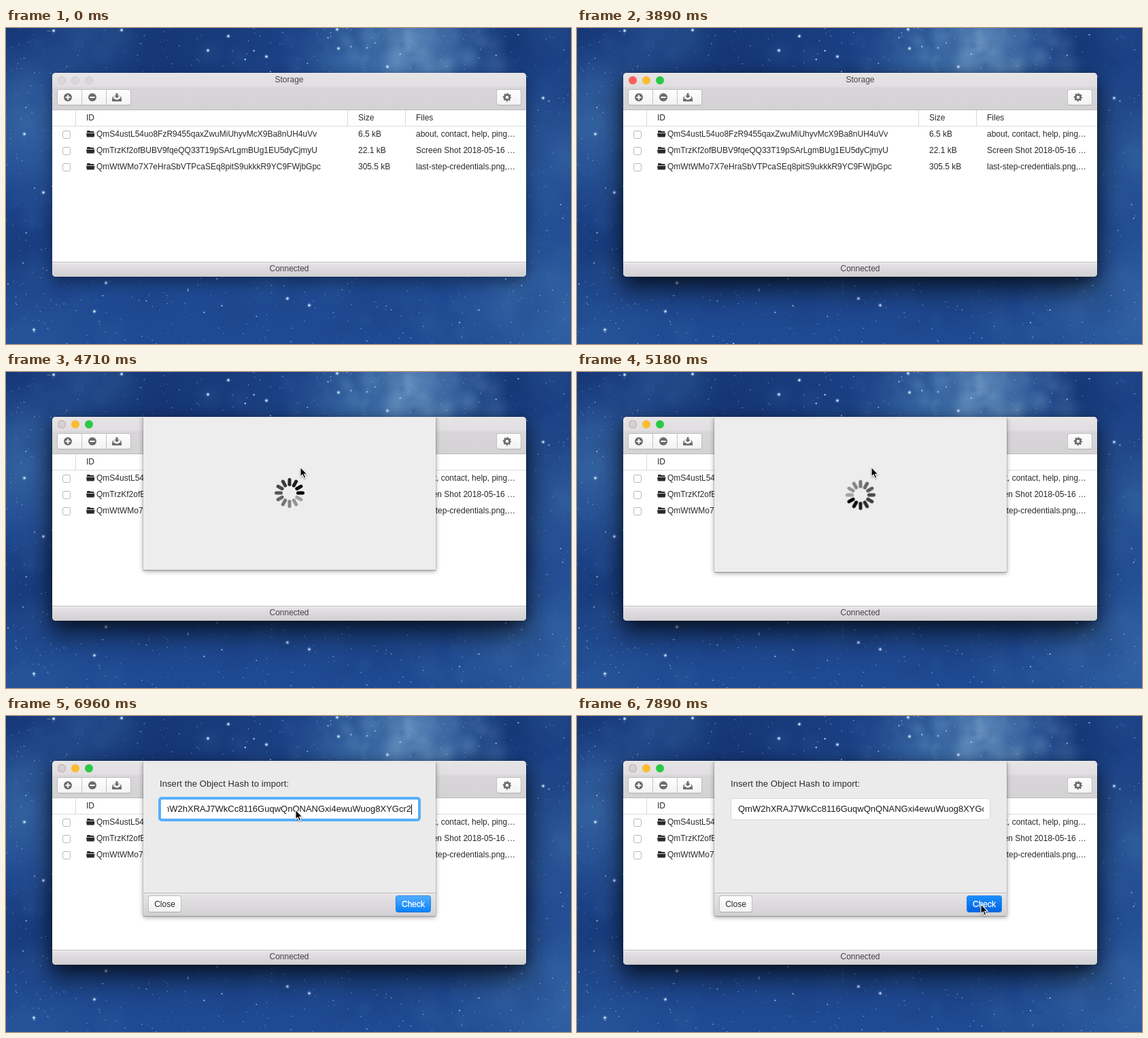
Recreate the animation shown at these times as an HTML page with a canvas. Size 831 px wide and 465 px high, loop 8000 ms.

```html
<!DOCTYPE html>
<html lang="en">
<head>
<meta charset="utf-8">
<title>Storage</title>
<style>
html, body { margin: 0; width: 100%; height: 100%; overflow: hidden; background: #1d4589; }
body { position: relative; font: 12px/16px "Liberation Sans", Arial, sans-serif; color: #2a2a2a; white-space: nowrap; }
body * { position: absolute; box-sizing: border-box; }
svg * { position: static; }
#sky { left: 0; top: 0; }

/* every animated part jumps between poses within one 8 s loop */
.a { animation: 8s step-end infinite; }

.shadow { left: 68px; top: 66px; width: 697px; height: 300px; border-radius: 5px; }
#idle { box-shadow: 0 0 1px rgba(0,0,0,.5), 0 8px 22px rgba(0,0,0,.4); }
#active { box-shadow: 0 0 1px rgba(0,0,0,.6), 0 20px 44px rgba(0,0,0,.58); animation-name: focus; }
@keyframes focus { 0% { opacity: 0 } 6.25%, 100% { opacity: 1 } }

#win { left: 68px; top: 66px; width: 697px; height: 300px; border-radius: 5px; overflow: hidden; background: #fff; }
#bar { left: 0; top: 0; width: 697px; height: 55px; border-bottom: 1px solid #bebcbe;
  background: linear-gradient(#f3f2f3 0, #e6e4e6 1px, #e0dee0 20px, #d8d6d8 22px, #d4d2d4 55px); }
#status { left: 0; top: 278px; width: 697px; height: 22px; border-top: 1px solid #bebcbe;
  background: linear-gradient(#f2f1f2 0, #e4e2e4 2px, #d1cfd1); }
.mid { left: 0; width: 100%; text-align: center; color: #454345; }

.light { top: 5px; width: 12px; height: 12px; border-radius: 50%; }
.off { background: #d3d1d3; border: 1px solid #bfbdbf; }
#ghost { left: 0; top: 0; }
#ghost .light { background: #d9d7d9; border: 1px solid #cbc9cb; }
#lights { left: 0; top: 0; animation-name: focus; }
#shut { animation-name: shut; }
@keyframes shut { 0% { opacity: 0 } 56.125%, 100% { opacity: 1 } }

.btn { border: 1px solid #c0bec0; border-bottom-color: #aeacae; border-radius: 4px; background: linear-gradient(#fdfdfd, #f3f3f3); }
.btn svg { left: -1px; top: -1px; }
#press { left: 72px; top: 0; width: 35px; height: 22px; background: #dcdcdc; animation-name: press; }
@keyframes press { 0% { opacity: 0 } 54.625% { opacity: 1 } 56.125%, 100% { opacity: 0 } }

#head { left: 0; top: 55px; width: 697px; height: 24px; border-bottom: 1px solid #dcdcdc; }
#head i { top: 0; width: 1px; height: 23px; background: #d9d9d9; }
#head span { top: 3px; }
.row { left: 0; width: 697px; height: 24px; }
.row span { top: 4px; }
.box { left: 15px; top: 7px; width: 12px; height: 12px; border: 1px solid #b9b9b9; border-radius: 3px; background: #fff; }
.row svg { left: 50px; top: 7px; }

#clip { left: 190px; top: 67px; width: 455px; height: 250px; overflow: hidden; }
#sheet { left: 12px; top: 0; width: 430px; height: 228px; background: linear-gradient(#e6e6e6, #ededed 4px);
  border-bottom: 1px solid #a9a9a9; box-shadow: 0 0 1px rgba(0,0,0,.6), 0 1px 7px rgba(0,0,0,.38); animation-name: drop; }
@keyframes drop {
  0% { transform: translateY(-250px) }
  56.125% { transform: translateY(-185px) }
  57.5% { transform: translateY(-52px) }
  58.875% { transform: translateY(-3px) }
  60.375%, 100% { transform: none }
}
#spin { left: 191px; top: 90px; animation-name: spin; }
@keyframes spin {
  0% { transform: rotate(-60deg) }
  57.5% { transform: rotate(-30deg) }
  58.875% { transform: rotate(0deg) }
  60.375% { transform: rotate(30deg) }
  61.75% { transform: rotate(60deg) }
  63.25% { transform: rotate(120deg) }
  64.75%, 100% { transform: rotate(150deg) }
}

#form { left: 0; top: 0; width: 430px; height: 227px; background: linear-gradient(#e6e6e6, #ebebeb 4px); animation-name: form; }
@keyframes form { 0% { opacity: 0 } 67.625%, 100% { opacity: 1 } }
#label { left: 24px; top: 25px; font-size: 13px; letter-spacing: .09px; }
#field { left: 24px; top: 54px; width: 382px; height: 32px; background: #fff; border: 1px solid #d9d9d9; border-radius: 4px; }
#ring { left: -3px; top: -3px; width: 386px; height: 36px; border: 4px solid #58aefa; border-radius: 5px; animation-name: ring; }
@keyframes ring { 0% { opacity: 0 } 75% { opacity: 1 } 98.625%, 100% { opacity: 0 } }
#view { left: 10px; top: 5px; width: 361px; height: 20px; overflow: hidden; font-size: 13px; line-height: 20px; color: #1c1c1c; }
#view span { top: 0; left: 0; }
#hint { color: #757575; animation-name: hint; }
@keyframes hint { 0% { opacity: 1 } 87%, 100% { opacity: 0 } }
#view #tail { left: auto; right: 2px; animation-name: tail; }
@keyframes tail { 0% { opacity: 0 } 87% { opacity: 1 } 98.625%, 100% { opacity: 0 } }
#start { animation-name: start; }
@keyframes start { 0% { opacity: 0 } 98.625%, 100% { opacity: 1 } }
#caret { left: 0; top: 3px; width: 1px; height: 15px; background: #000; animation-name: caret; }
@keyframes caret {
  0% { opacity: 0; left: 0 }
  75% { opacity: 1; left: 0 }
  81% { opacity: 0; left: 0 }
  87% { opacity: 1; left: 359px }
  92.875%, 100% { opacity: 0; left: 359px }
}
#foot { left: 0; top: 193px; width: 430px; height: 34px; border-top: 1px solid #bab8ba;
  background: linear-gradient(#f0eff0 0, #e5e3e5 2px, #d2d0d2); }
#foot .btn { top: 3px; height: 25px; line-height: 24px; text-align: center; }
#foot #check { left: 371px; width: 52px; color: #fff; border-color: #2a8ff0 #1a84ee #0a72dc;
  background: linear-gradient(#52adff, #0a82fb); -webkit-text-stroke: .3px #fff; animation-name: check; }
@keyframes check {
  0% { opacity: 0 }
  87% { opacity: 1; background: linear-gradient(#52adff, #0a82fb) }
  98.625%, 100% { opacity: 1; background: linear-gradient(#1d8dff, #0064e0) }
}

#cursor { left: -2px; top: -2px; filter: drop-shadow(0 1px 1px rgba(0,0,0,.35)); animation-name: cursor; }
@keyframes cursor {
  0% { transform: translate(230px, 490px) }
  48.625% { transform: translate(230px, 464px) }
  50.125% { transform: translate(208px, 335px) }
  51.625% { transform: translate(176px, 180px) }
  53.125% { transform: translate(163px, 104px) }
  56.125% { transform: translate(235px, 110px) }
  57.5% { transform: translate(375px, 130px) }
  58.875% { transform: translate(433px, 140px) }
  72.125% { transform: translate(430px, 139px) }
  73.625% { transform: translate(426px, 138px) }
  89.875% { transform: translate(430px, 143px) }
  91.375% { transform: translate(462px, 184px) }
  92.875% { transform: translate(530px, 258px) }
  94.25% { transform: translate(583px, 306px) }
  95.75% { transform: translate(596px, 295px) }
  97.125%, 100% { transform: translate(594px, 277px) }
}
</style>
</head>
<body>
<canvas id="sky" width="831" height="465"></canvas>
<div id="idle" class="shadow"></div>
<div id="active" class="shadow a"></div>

<div id="win">
  <div id="bar">
    <div class="mid" style="top:2px">Storage</div>
    <div id="ghost">
      <b class="light" style="left:8px"></b><b class="light" style="left:28px"></b><b class="light" style="left:48px"></b>
    </div>
    <div id="lights" class="a">
      <b class="light" style="left:8px;background:#fc605b"></b>
      <b class="light" style="left:28px;background:#fdbc2f"></b>
      <b class="light" style="left:48px;background:#29ca42"></b>
      <b id="shut" class="light off a" style="left:8px"></b>
    </div>
    <div class="btn" style="left:7px;top:24px;width:109px;height:24px;overflow:hidden">
      <div id="press" class="a"></div>
      <svg width="109" height="24" fill="#6c6c6e">
        <path d="M36.5 1V23M72.500 1V23" stroke="#c6c4c6"/>
        <circle cx="16" cy="12" r="6"/><circle cx="52" cy="12" r="6"/>
        <path d="M12.500 12H19.500M16 8.500V15.500M48.500 12H55.500" stroke="#fff" stroke-width="2"/>
        <path d="M86.500 6H89.500V9.500H92L88 13.500L84 9.500H86.500Z"/>
        <path d="M82 11L81 14V18H95V14L94 11H92.500L93.500 14H91L90 15.500H86L85 14H82.500L83.500 11Z"/>
      </svg>
    </div>
    <div class="btn" style="left:653px;top:24px;width:37px;height:24px">
      <svg width="37" height="24" fill="none" stroke="#6c6c6e">
        <circle cx="16" cy="12" r="3.700" stroke-width="2.800"/>
        <circle cx="16" cy="12" r="5.300" stroke-width="2" stroke-dasharray="2.080 2.080" stroke-dashoffset="1"/>
      </svg>
    </div>
  </div>

  <div id="head">
    <i style="left:34px"></i><i style="left:434px"></i><i style="left:519px"></i>
    <span style="left:50px">ID</span><span style="left:450px">Size</span><span style="left:535px">Files</span>
  </div>
  <div id="rows"></div>
  <div id="status"><div class="mid" style="top:1px">Connected</div></div>
</div>

<div id="clip">
  <div id="sheet" class="a">
    <svg id="spin" class="a" width="48" height="48" viewBox="-24 -24 48 48"></svg>
    <div id="form" class="a">
      <div id="label">Insert the Object Hash to import:</div>
      <div id="field">
        <div id="ring" class="a"></div>
        <div id="view">
          <span id="hint" class="a">Qm1A2B3C4D....</span>
          <span id="tail" class="a hash"></span>
          <span id="start" class="a hash"></span>
          <b id="caret" class="a"></b>
        </div>
      </div>
      <div id="foot">
        <div class="btn" style="left:7px;width:49px">Close</div>
        <div id="check" class="btn a">Check</div>
      </div>
    </div>
  </div>
</div>

<svg id="cursor" class="a" width="16" height="22">
  <path d="M2 2V16.200L5.200 13.200L7.500 18.600L9.900 17.600L7.600 12.300H12Z" fill="#000" stroke="#fff" stroke-width="1.100"/>
</svg>

<script>
const $ = id => document.getElementById(id);

const files = [
  ["QmS4ustL54uo8FzR9455qaxZwuMiUhyvMcX9Ba8nUH4uVv", "6.5 kB", "about, contact, help, ping…"],
  ["QmTrzKf2ofBUBV9fqeQQ33T19pSArLgmBUg1EU5dyCjmyU", "22.1 kB", "Screen Shot 2018-05-16 …"],
  ["QmWtWMo7X7eHraSbVTPcaSEq8pitS9ukkkR9YC9FWjbGpc", "305.5 kB", "last-step-credentials.png,…"]
];
const folder = `<svg width="13" height="10" fill="#2b2b2b">
  <path d="M1 3V1Q1 0 2 0H5L6.500 1H10.500Q11.500 1 11.500 2V3Z"/><path d="M0 3.700H12.500L11.700 9Q11.600 9.500 11 9.500H1.500Q.900 9.500 .800 9Z"/></svg>`;
$("rows").innerHTML = files.map(([id, size, names], i) => `<div class="row" style="top:${78 + 24 * i}px">
  <b class="box"></b>${folder}<span style="left:65px">${id}</span>
  <span style="left:450px">${size}</span><span style="left:535px">${names}</span></div>`).join("");

for (const el of document.querySelectorAll(".hash"))
  el.textContent = "QmW2hXRAJ7WkCc8116GuqwQnQNANGxi4ewuWuog8XYGcr2";

$("spin").innerHTML = Array.from({ length: 12 }, (_, i) =>
  `<rect x="10" y="-2.500" width="12" height="5" rx="2.500" opacity="${1 - i * .062}" transform="rotate(${-30 * i})"/>`).join("");

// night sky
const g = $("sky").getContext("2d");
let seed = 7;
const rnd = () => (seed = seed * 16807 % 2147483647) / 2147483647;

function glow(x, y, r, rgb, a) {
  const f = g.createRadialGradient(x, y, 0, x, y, r);
  f.addColorStop(0, `rgba(${rgb},${a})`);
  f.addColorStop(1, `rgba(${rgb},0)`);
  g.fillStyle = f;
  g.fillRect(x - r, y - r, 2 * r, 2 * r);
}
function star(x, y, r, a) {
  g.fillStyle = `rgba(215,232,255,${a})`;
  g.beginPath();
  g.arc(x, y, r, 0, 7);
  g.fill();
}

const base = g.createLinearGradient(0, 0, 0, 465);
base.addColorStop(0, "#1b4084");
base.addColorStop(1, "#1f4a93");
g.fillStyle = base;
g.fillRect(0, 0, 831, 465);

const dark = "15,42,100", pale = "80,135,190", bright = "140,180,215";
[[230, 40, 190, dark, .45], [0, 0, 110, dark, .4], [20, 330, 120, dark, .4], [740, 30, 80, dark, .35],
 [30, 140, 130, pale, .45], [120, 10, 90, pale, .2], [590, 30, 150, pale, .6], [600, 25, 75, bright, .4],
 [500, 50, 100, pale, .35], [815, 180, 130, pale, .3], [831, 420, 170, pale, .4], [20, 450, 130, pale, .15]
].forEach(b => glow(...b));

// mottled clouds
for (let i = 0; i < 150; i++)
  glow(rnd() * 831, rnd() * 465, 12 + rnd() * 34, rnd() < .5 ? dark : pale, .1);
for (let i = 0; i < 70; i++)
  glow(590 + (rnd() + rnd() - 1) * 150, 28 + (rnd() - .5) * 80, 6 + rnd() * 18, rnd() < .35 ? dark : bright, .14);

for (let i = 0; i < 1500; i++)
  star(rnd() * 831, rnd() * 465, .3 + rnd() * .5, .2 + rnd() * .55);
for (let i = 0; i < 90; i++)
  star(rnd() * 831, rnd() * 465, .7 + rnd() * .5, .8);
[[327, 12], [487, 2], [489, 30], [70, 4], [561, 57], [130, 417], [41, 444], [414, 398], [446, 408],
 [147, 375], [790, 103], [55, 242], [27, 156], [383, 42], [297, 33], [170, 3]
].forEach(([x, y]) => { glow(x, y, 4, "180,215,255", .6); star(x, y, 1.5, 1); });
</script>
</body>
</html>
```
